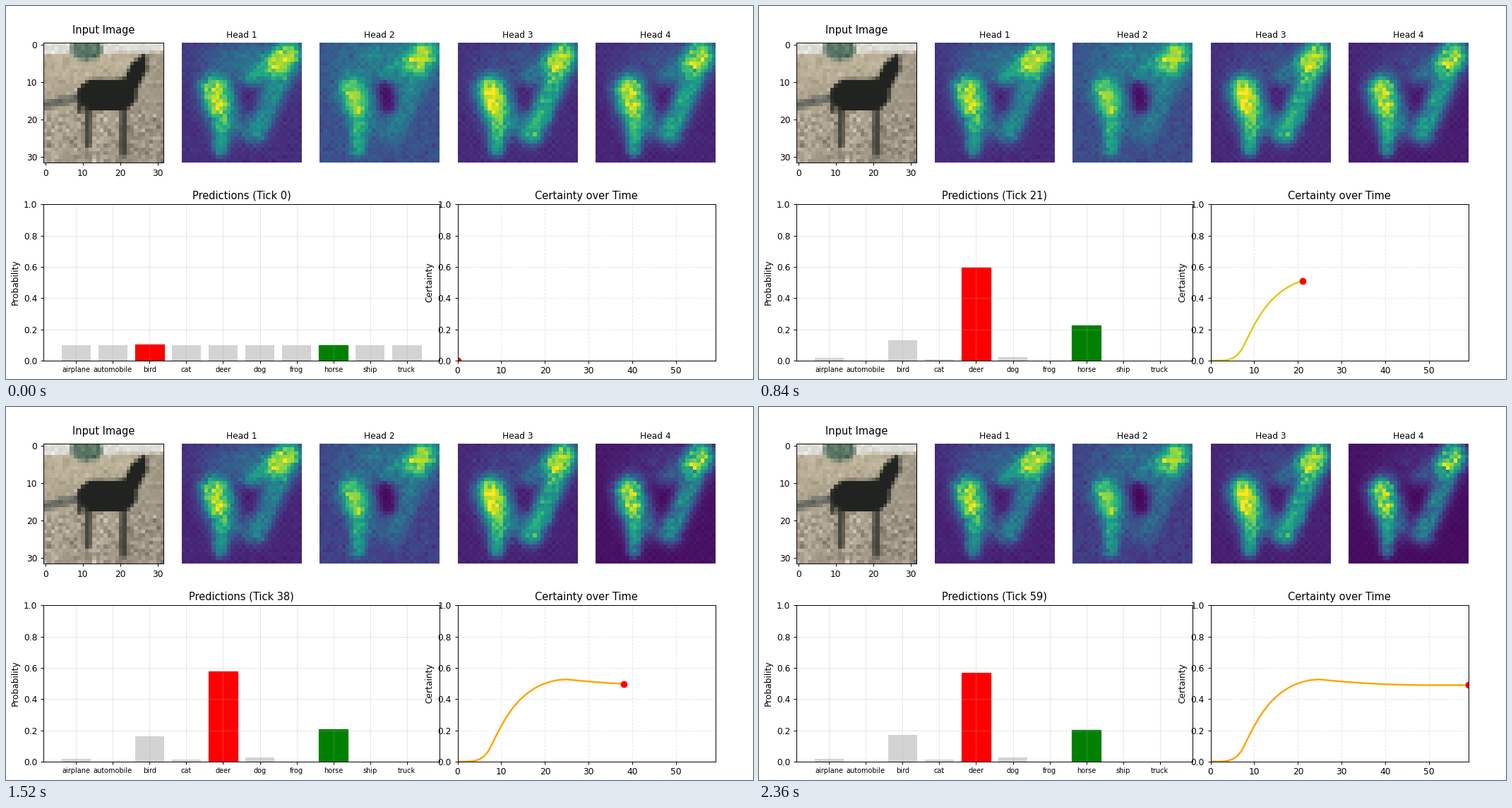
A matplotlib script for the animation above (2400 ms loop, 1058 by 529 pixels).

```python
import numpy as np
import matplotlib.pyplot as plt
from matplotlib.animation import FuncAnimation
from matplotlib.colors import to_rgb

W, H, DPI = 1058, 529, 88
TICKS, STEP_MS = 60, 40
N, SUB = 32, 4
rng = np.random.default_rng(11)

plt.rcParams["font.family"] = "DejaVu Sans"
fig = plt.figure(figsize=(W / DPI, H / DPI), dpi=DPI, facecolor="white")


def axes_px(x, y, w, h):
    """Axes placed in pixels, measured from the top left corner."""
    return fig.add_axes([x / W, 1 - (y + h) / H, w / W, h / H])


def ease(t, a, b):
    s = np.clip((t - a) / (b - a), 0, 1)
    return s * s * (3 - 2 * s)


def ease_out(t, a, b):
    return 1 - (1 - np.clip((t - a) / (b - a), 0, 1)) ** 2


def grid(n):
    c = (np.arange(n) + 0.5) * N / n
    return np.meshgrid(c, c)


def distance(X, Y, x0, y0, x1, y1):
    """Distance of every point to a line segment."""
    dx, dy = x1 - x0, y1 - y0
    s = np.clip(((X - x0) * dx + (Y - y0) * dy) / (dx * dx + dy * dy), 0, 1)
    return np.hypot(X - x0 - s * dx, Y - y0 - s * dy)


GX, GY = grid(N)
FX, FY = grid(N * SUB)


# --- input picture -------------------------------------------------------
def paint(img, mask, color, alpha=1.0):
    cover = mask.reshape(N, SUB, N, SUB).mean((1, 3))[..., None] * alpha
    return img * (1 - cover) + np.array(to_rgb(color)) * cover


def limb(x0, y0, x1, y1, r):
    return distance(FX, FY, x0, y0, x1, y1) < r


def scene():
    far, near = np.array(to_rgb("#c0b59b")), np.array(to_rgb("#a2998a"))
    img = far + (near - far) * (GY / N)[..., None]
    img = paint(img, FX + FY * 0.3 > 27, "#938b7d", 0.6)
    img = paint(img, FY < 3 - FX * 0.02, "#dfded8")
    img = paint(img, np.hypot((FX - 11.5) / 4.3, (FY - 1.6) / 3.1) < 1, "#587261")
    img = paint(img, limb(0, 16.7, 9, 14.8, 1.2), "#6c6d66")
    img = img + rng.normal(size=(N, N, 1)) * (0.03 + 0.03 * (GY > 18))[..., None]
    for x, y in (11.8, 27), (21.3, 29.5):
        img = paint(img, limb(x, 16, x, y, 1), "#3f3b36", 0.9)
    img = paint(img, limb(9.9, 12.5, 9.6, 18, 0.8), "#3f3b36")
    body = limb(13.5, 14, 20.5, 13.8, 4.2) | limb(22.5, 12, 25.3, 6.5, 2.2)
    head = limb(25.6, 6.5, 26.4, 4.2, 1.1)
    return np.clip(paint(img, body | head, "#20231f"), 0, 1)


# --- attention maps ------------------------------------------------------
# Every head looks at the same parts: x0, y0, x1, y1, width.
PARTS = {
    "rump": (8.8, 12.5, 9.6, 16, 3.3),
    "flank": (9, 13, 12, 21, 5),
    "leg": (10.3, 19, 10.3, 28.5, 2),
    "face": (28, 2.5, 26, 5, 3.4),
    "fore": (28.5, 4, 19.8, 24, 3.2),
    "mane": (25, 5, 18.5, 9.5, 2.5),
    "gap": (17.5, 12.5, 18.3, 16.5, 2.6),
}


class Head:
    """A map with a background, a glow at the top and a weight per part."""

    def __init__(self, base, glow, gamma, **weights):
        self.gamma = gamma
        v = base + glow * np.exp(-((GX - 19) / 14) ** 2 - ((GY - 4.5) / 6) ** 2)
        for name, a in weights.items():
            *seg, w = PARTS[name]
            reach = np.exp(-(distance(GX, GY, *seg) / w) ** 2.6)
            v += (1 - v if a > 0 else v) * a * reach
        v *= 1 + 0.09 * rng.normal(size=(N, N))
        v += 0.012 * (-1) ** np.add.outer(np.arange(N), np.arange(N))
        self.v = np.clip(v, 0, 0.97)

    def at(self, tick):
        return self.v ** (1 + self.gamma * ease(tick, 6, 56))


heads = [
    Head(0.13, 0.24, 0.18, flank=0.36, leg=0.42, mane=0.4, fore=0.38, face=0.65, gap=-0.3, rump=0.78),
    Head(0.24, 0.2, 0.25, flank=0.2, leg=0.42, mane=0.2, fore=0.22, face=0.65, gap=-0.8, rump=0.7),
    Head(0.12, 0.12, 0.16, flank=0.45, leg=0.48, mane=0.22, fore=0.55, face=0.6, gap=-0.3, rump=0.8),
    Head(0.1, 0.14, 0.5, flank=0.4, leg=0.45, mane=0.22, fore=0.5, face=0.6, gap=-0.3, rump=0.75),
]

# --- predictions and certainty -------------------------------------------
LABELS = "airplane automobile bird cat deer dog frog horse ship truck".split()
TRUE, FIRST = LABELS.index("horse"), LABELS.index("bird")

# Scores relative to the leading class: first guess, then settled opinion.
guess = np.array([-0.43, -1.15, -0.28, -0.86, 0, -0.72, -1.44, 0, -1.66, -1.37])
settled = np.array([-3.6, -7, -1.6, -4.3, 0, -3.4, -7.5, -1.02, -8, -7.5])
doubt = 0.4 * np.isin(LABELS, ["bird", "cat", "dog"])


def predict(tick):
    opening = min(1, tick / 7) ** 2.4
    score = guess * opening + (settled - guess) * ease_out(tick, 7, 25)
    score = score + doubt * ease_out(tick, 25, 50)
    score[FIRST] += 0.01
    p = np.exp(score)
    return p / p.sum()


ticks = np.arange(TICKS)
probs = np.array([predict(t) for t in ticks])
cert = 1 + (probs * np.log(probs)).sum(axis=1) / np.log(len(LABELS))

# --- layout --------------------------------------------------------------
LEFT, PITCH, SIDE, TOP = 53, 195.5, 170, 52.3
ROW2, ROW2_H = 281.3, 221.5

ax = axes_px(LEFT, TOP, SIDE, SIDE)
ax.imshow(scene(), aspect="auto")
ax.set_xticks(range(0, 31, 10))
ax.set_yticks(range(0, 31, 10))
ax.set_title("Input Image", fontsize=12, pad=10.5)

maps = []
for i, head in enumerate(heads, 1):
    ax = axes_px(LEFT + PITCH * i, TOP, SIDE, SIDE)
    maps.append(ax.imshow(head.at(0), cmap="viridis", vmin=0, vmax=0.97, aspect="auto"))
    ax.set_title(f"Head {i}", fontsize=10)
    ax.axis("off")

bar_ax = axes_px(LEFT, ROW2, 2 * PITCH + SIDE, ROW2_H)
bars = bar_ax.bar(range(10), probs[0], color="lightgray")
bar_ax.set_xlim(-0.89, 9.89)
bar_ax.set_ylim(0, 1)
bar_ax.set_xticks(range(10), LABELS, fontsize=8)
bar_ax.set_ylabel("Probability")
bar_ax.grid(True, alpha=0.3)
bar_title = bar_ax.set_title("", fontsize=12)

cert_ax = axes_px(LEFT + 3 * PITCH, ROW2, PITCH + SIDE, ROW2_H)
cert_ax.set_xlim(0, TICKS - 1)
cert_ax.set_ylim(0, 1)
cert_ax.set_title("Certainty over Time", fontsize=12)
cert_ax.set_ylabel("Certainty")
cert_ax.set_xlabel("Tick", x=0.277, labelpad=3.5)
cert_ax.grid(True, linestyle="--", alpha=0.3)
line, = cert_ax.plot([], [], lw=2)
dot, = cert_ax.plot([], [], "ro", ms=7)

YELLOW, ORANGE = np.array(to_rgb("#d5da28")), np.array(to_rgb("orange"))


def update(n):
    for im, head in zip(maps, heads):
        im.set_data(head.at(n))
    best = probs[n].argmax()
    for i, bar in enumerate(bars):
        color = "green" if i == TRUE else "red" if i == best else "lightgray"
        bar.set_height(probs[n, i])
        bar.set_facecolor(color)
        bar.set_edgecolor("none" if color == "lightgray" else color)
    bar_title.set_text(f"Predictions (Tick {n})")
    line.set_data(ticks[:n + 1], cert[:n + 1])
    line.set_color(YELLOW + (ORANGE - YELLOW) * ease(n, 15, 30))
    dot.set_data([n], [cert[n]])
    return [*maps, *bars, bar_title, line, dot]


anim = FuncAnimation(fig, update, frames=TICKS, interval=STEP_MS,
                     repeat=True, repeat_delay=0, blit=False)
plt.show()
```
